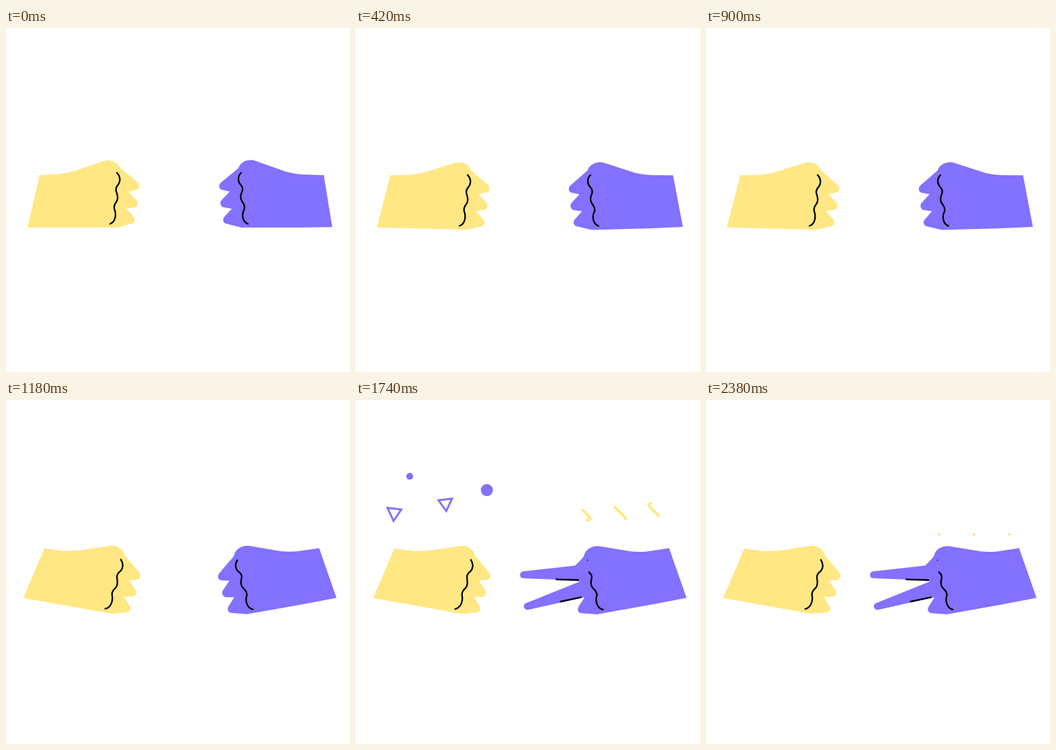
Write an HTML page that moves like this. It is 512 px wide and 512 px high and loops after 2400 ms.

```html
<!DOCTYPE html>
<html lang="en">
<head>
<meta charset="utf-8">
<title>Hand game</title>
<style>
  html, body { margin: 0; width: 100%; height: 100%; overflow: hidden; background: #fff; }
  svg { display: block; width: 100%; height: 100%; }
  .y { fill: #ffe783; }
  .p { fill: #8371ff; }
  .ink { fill: none; stroke: #000; stroke-width: 2.3; stroke-linecap: round; stroke-linejoin: round; }
  .tri { fill: none; stroke: #8371ff; stroke-width: 3; stroke-linejoin: miter; }
  .wave { fill: none; stroke: #ffe783; stroke-width: 4; stroke-linecap: round; stroke-linejoin: round; }
</style>
</head>
<body>
<svg viewBox="0 0 512 512">
  <g id="bits">
    <circle class="p" r="5"/>
    <circle class="p" r="9"/>
    <path class="tri" d="M-10 -8.5L10.5 -6L-1 11Z"/>
    <path class="tri" d="M-10.5 -6L9.5 -8.5L1 10Z"/>
  </g>
  <g id="waves"></g>

  <g id="left">
    <path class="y" d="M50 219L73 218Q86 217 103 212.5L144 198.5C154 194.5 166 198 170 208.5L195 229
      C200 233 198.500 240 193 241L182 243.500L194 256C198 260 195.500 266 191 266.800L179 269L190 281
      C193.500 285 191.500 290 188 291L166 297H32Z"/>
    <path class="ink" d="M165 215.500C170 220 171 228 167 233C164 236 163 239 164 243C166 248 168 254 164 259
      C161 263 160 266 161.500 270C164 276 164 288 155 291.500"/>
  </g>

  <g id="right">
    <path class="p" d="M473 219L440 218Q429 217 417 214L372 198C361 194 349 199 346 208.500L320 230
      C315.500 234 317 240 322 241L333 243.500L321 256C317.500 260 319.500 266 324 266.800L336 269L325 281
      C321.500 285 323.500 290 327 291L350 297L435 297L485.500 296.300Z"/>
    <path class="ink" d="M350 215.500C345 220 344.500 228 349 233C352 236 353 239 351.500 243C349 248 348 254 352 259
      C355 263 356 266 354.500 270C351 276 351 288 360 291.500"/>
  </g>

  <g id="finger1">
    <path class="p" d="M338 235L326 246.500L248.500 255C242.500 256 242.500 265 249 265.300L331 268.500L346 268V240Z"/>
    <path class="ink" d="M298 267L331 268"/>
  </g>
  <g id="finger2">
    <path class="p" d="M331 271L252.500 302.500C247.500 305.500 250 313 256 312.300L340 293.500L346 275Z"/>
    <path class="ink" d="M304.500 300L335 293.700"/>
  </g>
</svg>
<script>
const LOOP = 2400, BEAT = 240, REVEAL = 1200, PEAK = 1680;
const $ = id => document.getElementById(id);
const span = (t, a, b) => Math.min(1, Math.max(0, (t - a) / (b - a)));
const smooth = u => u * u * (3 - 2 * u);
const easeOut = u => 1 - Math.pow(1 - u, 1.7);
const mix = (a, b, k) => a + (b - a) * k;

// Highest point and hidden resting point of each piece
const bits = [
  [79.5, 111, 100, 240],
  [195.5, 132, 158, 236],
  [56, 167.5, 100, 242],
  [133.5, 153.5, 125, 240]
];
const bitNodes = [...$('bits').children];

const turn = 'c3 2.5 2 4 0 5l-13 1.5c-3 2 -2.5 4.5 -1 6l14 14';
const waves = [0, 1, 2].map(i => {
  const w = document.createElementNS('http://www.w3.org/2000/svg', 'path');
  w.setAttribute('class', 'wave');
  w.setAttribute('d', `M${347 + 52.3 * i} 120.5` + turn.repeat(3));
  w.setAttribute('pathLength', 100);
  $('waves').append(w);
  return w;
});

function swing(t) {
  if (t >= REVEAL) return 1;
  const n = Math.floor(t / BEAT), k = smooth(t / BEAT - n);
  return n % 2 ? 1 - k : k;
}

function grow(id, x, y, k) {
  $(id).setAttribute('transform', `translate(${x} ${y}) scale(${k}) translate(${-x} ${-y})`);
}

function draw(t) {
  const angle = 10.2 * swing(t);
  $('left').setAttribute('transform', `rotate(${angle} 42 260)`);
  $('right').setAttribute('transform', `rotate(${-angle} 478 259)`);

  const shown = t > REVEAL;
  for (const id of ['finger1', 'finger2', 'bits', 'waves'])
    $(id).style.display = shown ? '' : 'none';
  if (!shown) return;

  const k = mix(0.2, 1, smooth(span(t, REVEAL, REVEAL + 160)));
  grow('finger1', 333, 260, k);
  grow('finger2', 337, 283, k);

  const drop = t < PEAK ? 1 - smooth(span(t, REVEAL, PEAK)) : smooth(span(t, PEAK, LOOP));
  bits.forEach(([x, y, x2, y2], i) =>
    bitNodes[i].setAttribute('transform', `translate(${mix(x, x2, drop)} ${mix(y, y2, drop)})`));

  waves.forEach((w, i) => {
    const head = 100 * easeOut(span(t, REVEAL + 70 * i, 2200));
    const tail = Math.min(99.9, 100 * easeOut(span(t, 1320 + 60 * i, LOOP)));
    w.style.display = head > 0 ? '' : 'none';
    w.setAttribute('stroke-dasharray', `${Math.max(0.1, head - tail)} 200`);
    w.setAttribute('stroke-dashoffset', -tail);
  });
}

const start = performance.now();
function tick() {
  draw((performance.now() - start) % LOOP);
  requestAnimationFrame(tick);
}
draw(0);
requestAnimationFrame(tick);
</script>
</body>
</html>
```
